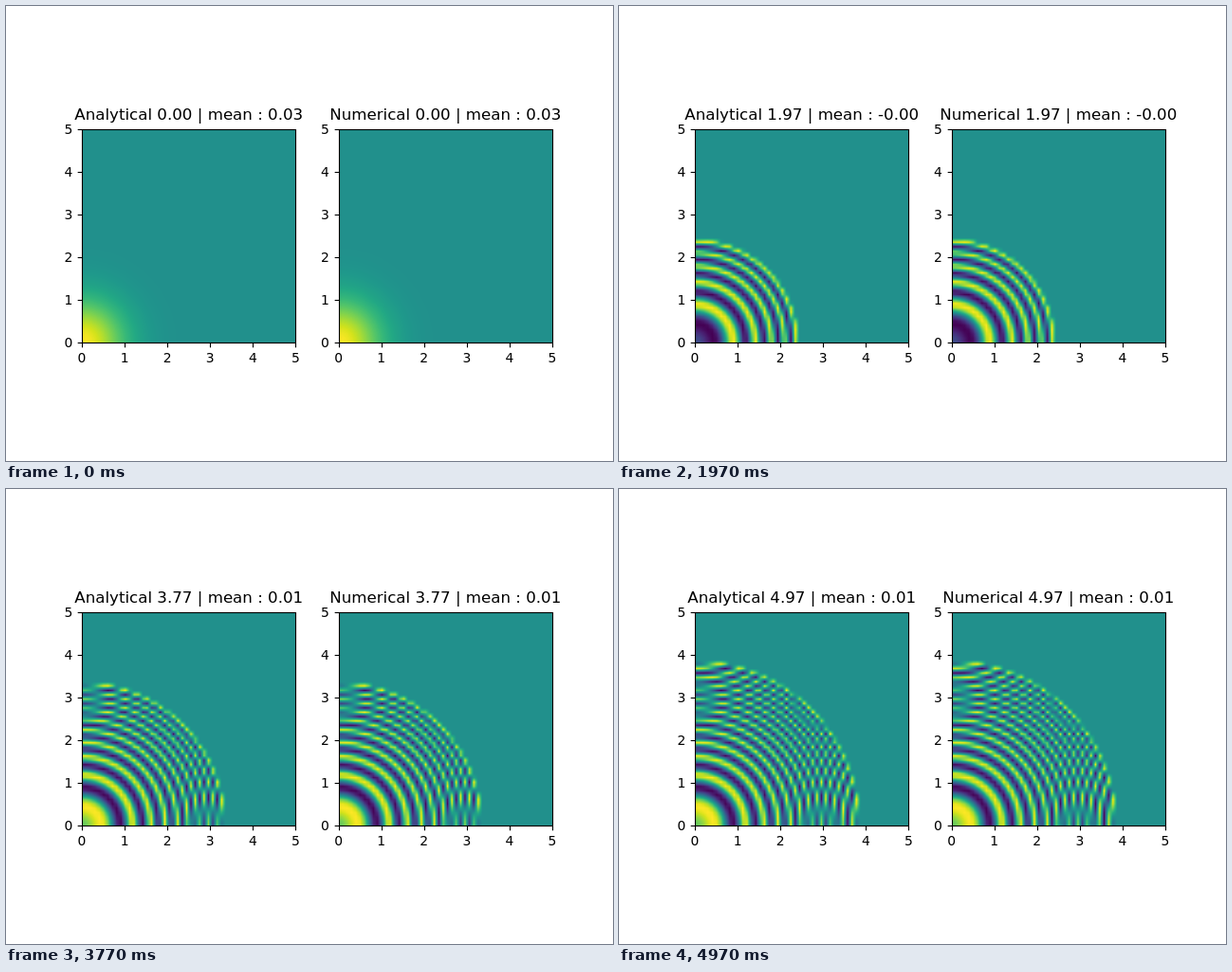
These frames come from a looping animation (640x480 px, 5000 ms). An HTML page with a canvas:

```html
<!DOCTYPE html>
<html>
<head>
<meta charset="utf-8">
<style>
  html, body { margin: 0; width: 100%; height: 100%; overflow: hidden; background: #fff; }
  canvas { display: block; }
</style>
</head>
<body>
<canvas id="stage" width="640" height="480"></canvas>
<script>
const ctx = document.getElementById('stage').getContext('2d');
const N = 50, SPAN = 5, SIZE = 225.45, TOP = 129.67, BOTTOM = TOP + SIZE;
const FONT = '"DejaVu Sans", Verdana, sans-serif';
const panels = [{ name: 'Analytical', left: 80 }, { name: 'Numerical', left: 350.55 }];
const snap = v => Math.floor(v + 0.5) + 0.5;

// Colour scale for -1..1, as 256 steps
const stops = '440154 481a6c 472f7d 414487 39568c 31688e 2a788e 23888e 1f988b 22a884 35b779 54c568 7ad151 a5db36 d2e21b fde725'
  .split(' ').map(h => [0, 2, 4].map(i => parseInt(h.substr(i, 2), 16)));
const scale = Array.from({ length: 256 }, (_, i) => {
  const p = i / 255 * (stops.length - 1), j = Math.min(stops.length - 2, Math.floor(p));
  return stops[j].map((c, n) => c + (stops[j + 1][n] - c) * (p - j));
});

// A bump at rest, replaced by a sine wave once the front r² = 3t has passed
const grid = new Float64Array(N * N);
function solve(t) {
  const d = SPAN / (N - 1);
  let sum = 0;
  for (let j = 0; j < N; j++) for (let i = 0; i < N; i++) {
    const r2 = (i * i + j * j) * d * d;
    const u = r2 < 3 * t ? Math.sin(5 * Math.PI * (t - r2 / 3)) : Math.exp(-r2);
    grid[j * N + i] = u;
    sum += u;
  }
  return sum / (N * N);
}

function cell(pos) {
  const p = Math.max(0, Math.min(N - 1, pos / SIZE * (N - 1)));
  const i = Math.min(N - 2, Math.floor(p));
  return [i, p - i];
}

function drawField(left) {
  const x0 = Math.round(left), y0 = Math.round(TOP), w = 225, h = 225;
  const img = ctx.createImageData(w, h);
  const cols = Array.from({ length: w }, (_, x) => cell(x0 + x + 0.5 - left));
  for (let y = 0, o = 0; y < h; y++) {
    const [j, fy] = cell(BOTTOM - (y0 + y + 0.5));
    for (let x = 0; x < w; x++, o += 4) {
      const [i, fx] = cols[x], k = j * N + i;
      const low = grid[k] + (grid[k + 1] - grid[k]) * fx;
      const high = grid[k + N] + (grid[k + N + 1] - grid[k + N]) * fx;
      const u = low + (high - low) * fy;
      const c = scale[Math.min(255, Math.floor((u + 1) * 128))];
      img.data[o] = c[0];
      img.data[o + 1] = c[1];
      img.data[o + 2] = c[2];
      img.data[o + 3] = 255;
    }
  }
  ctx.putImageData(img, x0, y0);
}

function line(x1, y1, x2, y2) {
  ctx.beginPath();
  ctx.moveTo(x1, y1);
  ctx.lineTo(x2, y2);
  ctx.stroke();
}

function text(str, x, y, size, align) {
  ctx.font = size + 'px ' + FONT;
  ctx.textAlign = align;
  ctx.fillText(str, x, y);
}

function drawAxes(left, title) {
  const l = snap(left), t = snap(TOP), r = snap(left + SIZE), b = snap(BOTTOM);
  ctx.fillStyle = ctx.strokeStyle = '#000';
  ctx.lineWidth = 1.11;
  ctx.strokeRect(l, t, r - l, b - t);
  for (let i = 0; i <= SPAN; i++) {
    const x = left + SIZE * i / SPAN, y = BOTTOM - SIZE * i / SPAN;
    line(snap(x), b, snap(x), b + 4.86);
    line(l, snap(y), l - 4.86, snap(y));
    text(i, x, 376, 13.889, 'center');
    text(i, left - 9.7, Math.round(y + 5), 13.889, 'right');
  }
  text(title, left + SIZE / 2, 120, 16.667, 'center');
}

function draw(t) {
  const mean = solve(t);
  ctx.fillStyle = '#fff';
  ctx.fillRect(0, 0, 640, 480);
  for (const { name, left } of panels) {
    drawField(left);
    drawAxes(left, `${name} ${t.toFixed(2)} | mean : ${mean.toFixed(2)}`);
  }
}

let start, shown = -1;
function tick(now) {
  start ??= now;
  const hundredths = Math.floor((now - start) % 5000 / 10);
  const step = Math.floor((hundredths + 0.5) * 0.3); // 30 steps per second
  if (step !== shown) draw((shown = step) / 30);
  requestAnimationFrame(tick);
}
draw(0);
requestAnimationFrame(tick);
</script>
</body>
</html>
```
